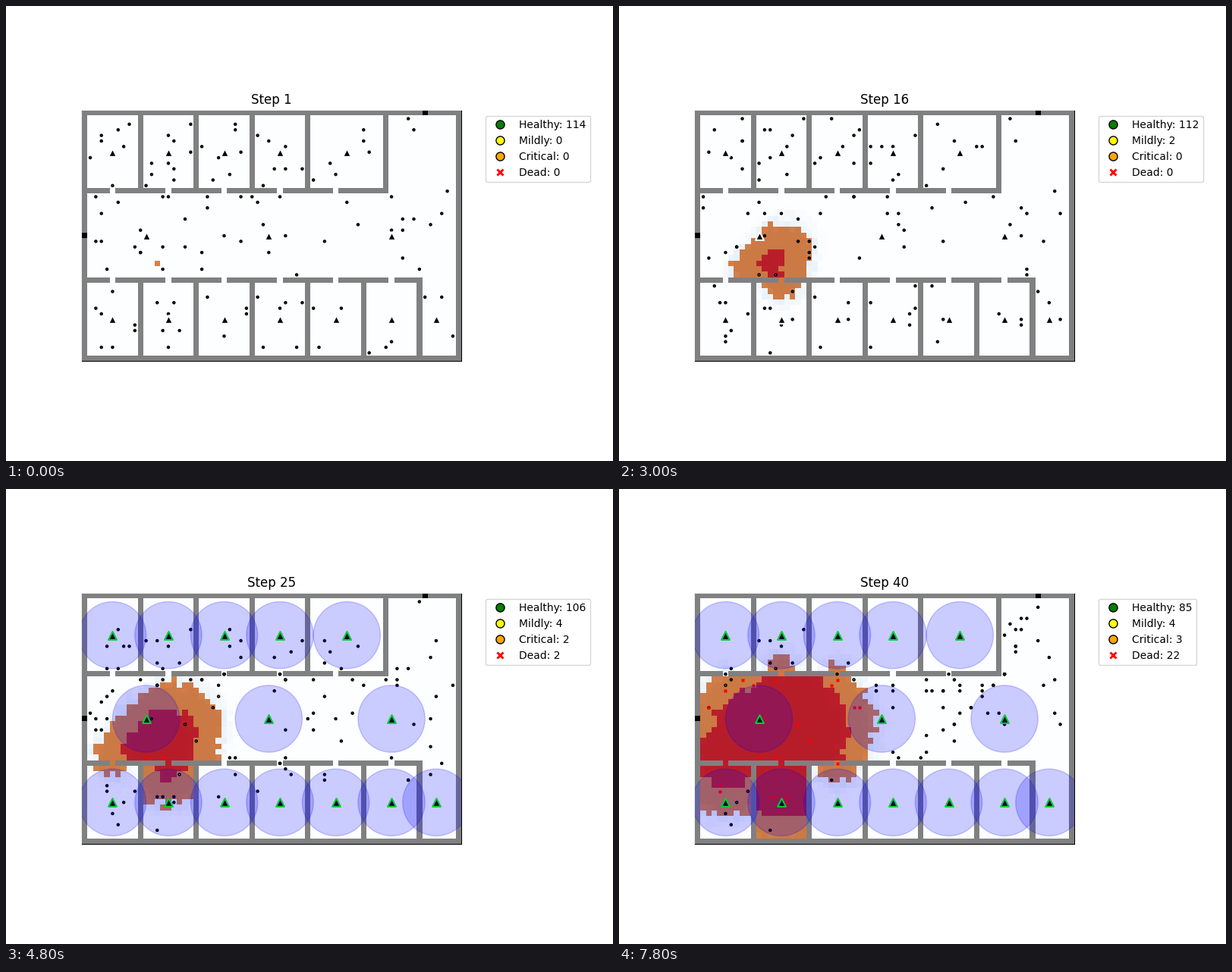
A matplotlib script that plays this animation: 800 px wide and 600 px high, repeating every 8 s.

```python
import numpy as np
import matplotlib.pyplot as plt
from matplotlib.animation import FuncAnimation
from matplotlib.lines import Line2D
from matplotlib.patches import Circle

W, H, STEPS, ALARM = 68, 45, 40, 18
IGNITION = (13, 27)
EXITS = [(0, 22), (61, 0)]
TOP_DOORS = [5, 15, 25, 35, 45]
LOW_DOORS = [5, 15, 25, 35, 45, 55]
DETECTORS = ([(x, 7) for x in (5, 15, 25, 35, 47)]
             + [(x, 22) for x in (11, 33, 55)]
             + [(x, 37) for x in (5, 15, 25, 35, 45, 55, 63)])
# x0, y0, x1, y1, people
ROOMS = [(1, 1, 9, 13, 7), (11, 1, 19, 13, 10), (21, 1, 29, 13, 7),
         (31, 1, 39, 13, 7), (41, 1, 53, 13, 6), (55, 1, 66, 14, 3),
         (1, 15, 66, 29, 42), (1, 31, 9, 43, 7), (11, 31, 19, 43, 6),
         (21, 31, 29, 43, 4), (31, 31, 39, 43, 6), (41, 31, 49, 43, 3),
         (51, 31, 59, 43, 3), (61, 30, 66, 43, 3)]
# extra resistance of single doorways against the fire
DOOR_DELAY = {(5, 14): 0.3, (15, 14): 2.4, (25, 30): 2}

HEALTHY, MILD, CRITICAL, DEAD = range(4)
COLORS = np.array(["green", "yellow", "orange", "red"])
NAMES = ["Healthy", "Mildly", "Critical", "Dead"]

rng = np.random.default_rng(7)


# ---------- floor plan ----------
def build_walls():
    solid = np.zeros((H, W), bool)
    solid[[0, -1], :] = True
    solid[:, [0, -1]] = True
    solid[:15, [10, 20, 30, 40, 54]] = True
    solid[30:, [10, 20, 30, 40, 50, 60]] = True
    solid[14, :55] = True
    solid[30, :61] = True
    solid[14, TOP_DOORS] = False
    solid[30, LOW_DOORS] = False
    for x, y in EXITS:
        solid[y, x] = False
    return solid


solid = build_walls()


# ---------- fire ----------
def corridor_reach(x, y):
    dx, up = x - IGNITION[0], IGNITION[1] - y
    lag = np.clip(0.6 * np.minimum(-dx, up), 0, 2.2)
    lead = np.clip(0.25 * np.minimum(dx, up), 0, 1.5)
    return np.hypot(dx, up) + lag - lead


def build_reach():
    yy, xx = np.mgrid[0:H, 0:W].astype(float)
    reach = corridor_reach(xx, yy)
    for y, doors in ((14, TOP_DOORS), (30, LOW_DOORS)):
        for x in doors:
            start = corridor_reach(x, y) + DOOR_DELAY.get((x, y), 0)
            for x0, y0, x1, y1, _ in ROOMS:
                inside = x0 <= x <= x1 and (y1 == y - 1 or y0 == y + 1)
                if inside and y1 - y0 == 12:
                    room = np.s_[y0:y1 + 1, x0:x1 + 1]
                    reach[room] = start + np.hypot(xx[room] - x, yy[room] - y)
            reach[y, x] = start
    reach += rng.uniform(-0.7, 0.7, reach.shape)
    reach[solid] = 99
    reach[IGNITION[1], IGNITION[0]] = 0
    return reach


reach = build_reach()


def radius(step):
    return np.interp(step, [1, 11, 16, 21, 29, 35, 40],
                     [0.3, 4.8, 7, 9.2, 13, 15.3, 18])


steps_axis = np.arange(1, STEPS + 1)
arrival = np.interp(reach, radius(steps_axis), steps_axis, right=999)
arrival[IGNITION[1], IGNITION[0]] = 1


def mix(a, b, t):
    return np.array(a) + (np.array(b) - np.array(a)) * t[..., None]


def floor_image(step):
    near = np.clip((radius(step) + 2.5 - reach) / 2.5, 0, 1) * (step > 3)
    img = mix((253, 254, 255), (232, 241, 249), near ** 1.5)
    age = step - arrival
    flame = mix((212, 129, 74), (203, 121, 69), np.clip(age / 2.5, 0, 1))
    core = mix((188, 31, 44), (183, 29, 41), np.clip((age - 10) / 4, 0, 1))
    img = np.where((age >= 0)[..., None], flame, img)
    img = np.where((age >= 10)[..., None], core, img)
    img[solid] = 128
    for x, y in EXITS:
        img[y, x] = 0
    return img / 255


# ---------- people ----------
def tally(step):
    keys = [1, 11, 16, 21, 29, 35, 40]

    def at(vals):
        return int(round(float(np.interp(step, keys, vals))))

    well = at([114, 114, 112, 111, 102, 91, 85])
    crit = at([0, 0, 0, 0, 3, 3, 3])
    dead = at([0, 0, 0, 1, 4, 14, 22])
    return well, 114 - well - crit - dead, crit, dead


AROUND = [(dx, dy) for dx in (-1, 0, 1) for dy in (-1, 0, 1) if dx or dy]


def exit_distance(blocked):
    dist = np.full((H, W), 999)
    queue = [[] for _ in range(200)]
    queue[12].append(EXITS[0])
    queue[0].append(EXITS[1])
    for d, cells in enumerate(queue):
        for x, y in cells:
            if dist[y, x] <= d:
                continue
            dist[y, x] = d
            for dx, dy in AROUND:
                u, v = x + dx, y + dy
                if 0 <= u < W and 0 <= v < H and not blocked[v, u] \
                        and dist[v, u] == 999 and d < 199:
                    queue[d + 1].append((u, v))
    return dist


def wander(pos, room, burning):
    x, y = pos + rng.integers(-1, 2, 2)
    x0, y0, x1, y1, _ = room
    if x0 <= x <= x1 and y0 <= y <= y1 and not burning[y, x]:
        return np.array([x, y])
    return pos


def flee(pos, dist):
    x, y = pos
    options = [(dist[y + dy, x + dx], rng.random(), x + dx, y + dy)
               for dx, dy in AROUND
               if 0 <= x + dx < W and 0 <= y + dy < H]
    best = min(options)
    return np.array(best[2:]) if best[0] < dist[y, x] else pos


def simulate():
    home, pos = [], []
    for room in ROOMS:
        x0, y0, x1, y1, count = room
        for _ in range(count):
            home.append(room)
            pos.append((rng.integers(x0, x1 + 1), rng.integers(y0, y1 + 1)))
    pos = np.array(pos)
    n = len(pos)
    status = np.zeros(n, int)
    gone = np.zeros(n, bool)
    dose = np.zeros(n)
    pace = np.array([0.68, 0.45, 0.15, 0])
    history = []
    for step in range(1, STEPS + 1):
        burning = arrival <= step
        if step >= ALARM:
            dist = exit_distance(solid | burning)
        for i in range(n) if step > 1 else ():
            if gone[i] or status[i] == DEAD:
                continue
            if step < ALARM:
                pos[i] = wander(pos[i], home[i], burning)
            elif rng.random() < pace[status[i]]:
                pos[i] = flee(pos[i], dist)
                gone[i] = tuple(pos[i]) in EXITS
        heat = radius(step) - reach[pos[:, 1], pos[:, 0]]
        dose += np.exp(np.clip(heat, -20, 4) / 2)

        _, mild, crit, dead = tally(step)
        alive = [i for i in np.argsort(-dose)
                 if status[i] != DEAD and not gone[i]]
        dying = dead - int(np.sum(status == DEAD))
        status[status != DEAD] = HEALTHY
        status[alive[:dying]] = DEAD
        status[alive[dying:dying + crit]] = CRITICAL
        status[alive[dying + crit:dying + crit + mild]] = MILD
        history.append((pos.copy() + 0.5, status.copy(), gone.copy()))
    return history


HISTORY = simulate()

# ---------- drawing ----------
fig, ax = plt.subplots(figsize=(8, 6), dpi=100)
fig.subplots_adjust(left=0.125, right=0.75, bottom=0.11, top=0.88)
# the floor lies above the frame lines, which show only at right and bottom
floor = ax.imshow(floor_image(1), extent=(0, W, H, 0),
                  interpolation="nearest", zorder=3)
ax.set(xlim=(0, W), ylim=(H, 0), xticks=[], yticks=[])

people = ax.scatter([], [], s=4, edgecolors="black", linewidths=1.2, zorder=4)
bodies = ax.scatter([], [], s=6, marker="x", c="red", linewidths=1.5, zorder=4)
centres = np.array(DETECTORS) + 0.5
sensors = ax.scatter(*centres.T, s=60, marker="^", c="black",
                     edgecolors="white", linewidths=1.5, zorder=5)
rings = [ax.add_patch(Circle(c, 6, color="blue", alpha=0.2, zorder=6))
         for c in centres]

title = ax.set_title("Step 1")
handles = [Line2D([0], [0], marker="X" if k == DEAD else "o", color="w",
                  markerfacecolor=COLORS[k], markersize=8,
                  markeredgecolor="white" if k == DEAD else "black",
                  label=NAMES[k]) for k in range(4)]
legend = ax.legend(handles=handles, loc="upper left", bbox_to_anchor=(1.05, 1))


def draw(frame):
    step = frame + 1
    pos, status, gone = HISTORY[frame]
    floor.set_data(floor_image(step))
    living = (status != DEAD) & ~gone
    people.set_offsets(pos[living])
    people.set_facecolors(COLORS[status[living]])
    bodies.set_offsets(pos[status == DEAD])
    alarm = step >= ALARM
    sensors.set_edgecolors("lime" if alarm else "white")
    for ring in rings:
        ring.set_visible(alarm)
    title.set_text(f"Step {step}")
    for text, name, count in zip(legend.get_texts(), NAMES, tally(step)):
        text.set_text(f"{name}: {count}")
    return []


anim = FuncAnimation(fig, draw, frames=STEPS, interval=200, repeat=True,
                     repeat_delay=0, blit=False)
plt.show()
```
